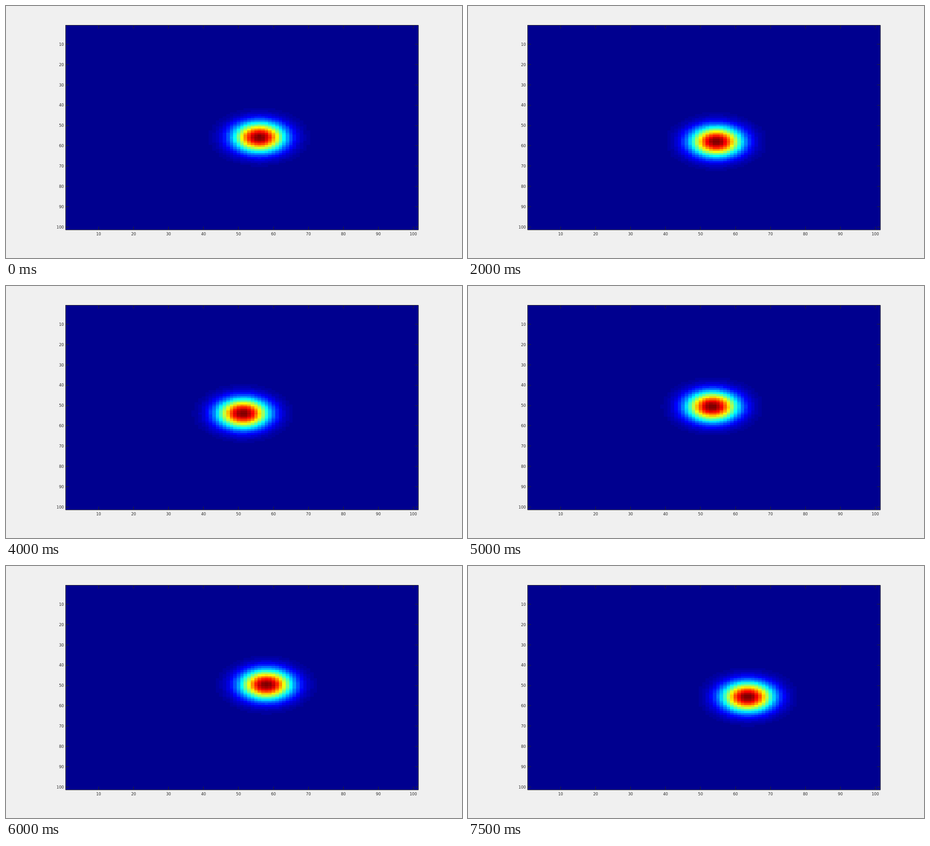
Recreate the animation shown at these times as an HTML page. Size 1006 px wide and 557 px high, loop 8000 ms.

```html
<!DOCTYPE html>
<html lang="en">
<head>
<meta charset="utf-8">
<title>Moving Gaussian heat map</title>
<style>
  html, body { margin: 0; width: 100%; height: 100%; overflow: hidden; background: #f0f0f0; }
  svg { display: block; width: 100%; height: 100%; }
  text { font: 8.4px "DejaVu Sans", sans-serif; fill: #262626; }
  #cells { shape-rendering: crispEdges; }
  #axes { fill: none; stroke: #262626; stroke-width: 1; }
</style>
</head>
<body>
<svg viewBox="0 0 1006 557">
  <g id="cells"></g>
  <path id="axes"/>
  <g id="labels"></g>
</svg>
<script>
const NS = 'http://www.w3.org/2000/svg';
const SIZE = 101, LEVELS = 64, SIGMA = 5, REACH = 16;
const LEFT = 131.1, TOP = 42, W = 779, H = 453;
const STEP = 500, STEPS = 16;
const CENTER = { x: 55.5, y: 55.65 };

const $ = id => document.getElementById(id);
const edgeX = i => Math.round(LEFT + i * W / SIZE);
const edgeY = i => Math.round(TOP + i * H / SIZE);

function add(parent, tag, attrs, text) {
  const el = document.createElementNS(NS, tag);
  for (const key in attrs) el.setAttribute(key, attrs[key]);
  if (text !== undefined) el.textContent = text;
  parent.appendChild(el);
  return el;
}

// Jet colour map, level 1 to 64
function jet(level) {
  const ramp = x => Math.round(255 * Math.max(0, Math.min(1, x / 16, (48 - x) / 16)));
  return `rgb(${ramp(level - 24)},${ramp(level - 8)},${ramp(level + 8)})`;
}

const box = (x0, y0, x1, y1) => `M${x0} ${y0}H${x1}V${y1}H${x0}Z`;

add($('cells'), 'path', {
  d: box(edgeX(0), edgeY(0), edgeX(SIZE), edgeY(SIZE)),
  fill: jet(1)
});
const layers = Array.from({ length: LEVELS }, (_, i) =>
  add($('cells'), 'path', { fill: jet(i + 1) }));

function drawAxes() {
  const x0 = 131.5, y0 = 42.5, x1 = 909.9, y1 = 494.9, tick = 7.5;
  let d = box(x0, y0, x1, y1);
  for (let n = 10; n <= 100; n += 10) {
    const x = LEFT + (n - 0.5) * W / SIZE;
    const y = TOP + (n - 0.5) * H / SIZE;
    const px = Math.floor(x) + 0.5, py = Math.floor(y) + 0.5;
    d += `M${px} ${y0}v${tick}M${px} ${y1}v${-tick}`;
    d += `M${x0} ${py}h${tick}M${x1} ${py}h${-tick}`;
    add($('labels'), 'text', { x, y: 507.3, 'text-anchor': 'middle' }, n);
    add($('labels'), 'text', { x: 127.6, y: y + 3.3, 'text-anchor': 'end' }, n);
  }
  $('axes').setAttribute('d', d);
}

// The peak walks outwards along a spiral, one turn per loop
function peakAt(step) {
  const angle = 2 * Math.PI * (step + 1) / STEPS;
  const radius = 0.5 * (step + 1);
  return {
    x: CENTER.x + radius * Math.cos(angle),
    y: CENTER.y + radius * Math.sin(angle)
  };
}

function drawPeak({ x, y }) {
  const value = (col, row) =>
    Math.exp(-((col - x) ** 2 + (row - y) ** 2) / (2 * SIGMA ** 2));
  const cx = Math.round(x), cy = Math.round(y);
  const max = value(cx, cy);
  const paths = Array(LEVELS).fill('');
  for (let row = cy - REACH; row <= cy + REACH; row++) {
    for (let col = cx - REACH; col <= cx + REACH; col++) {
      const level = Math.min(LEVELS - 1, Math.floor(LEVELS * value(col, row) / max));
      if (level > 0) paths[level] += box(edgeX(col - 1), edgeY(row - 1), edgeX(col), edgeY(row));
    }
  }
  layers.forEach((layer, i) => layer.setAttribute('d', paths[i]));
}

let shown = -1;
function render(ms) {
  const step = Math.floor(ms / STEP) % STEPS;
  if (step === shown) return;
  shown = step;
  drawPeak(peakAt(step));
}

drawAxes();
render(0);
let start;
requestAnimationFrame(function tick(now) {
  if (start === undefined) start = now;
  render(now - start);
  requestAnimationFrame(tick);
});
</script>
</body>
</html>
```
